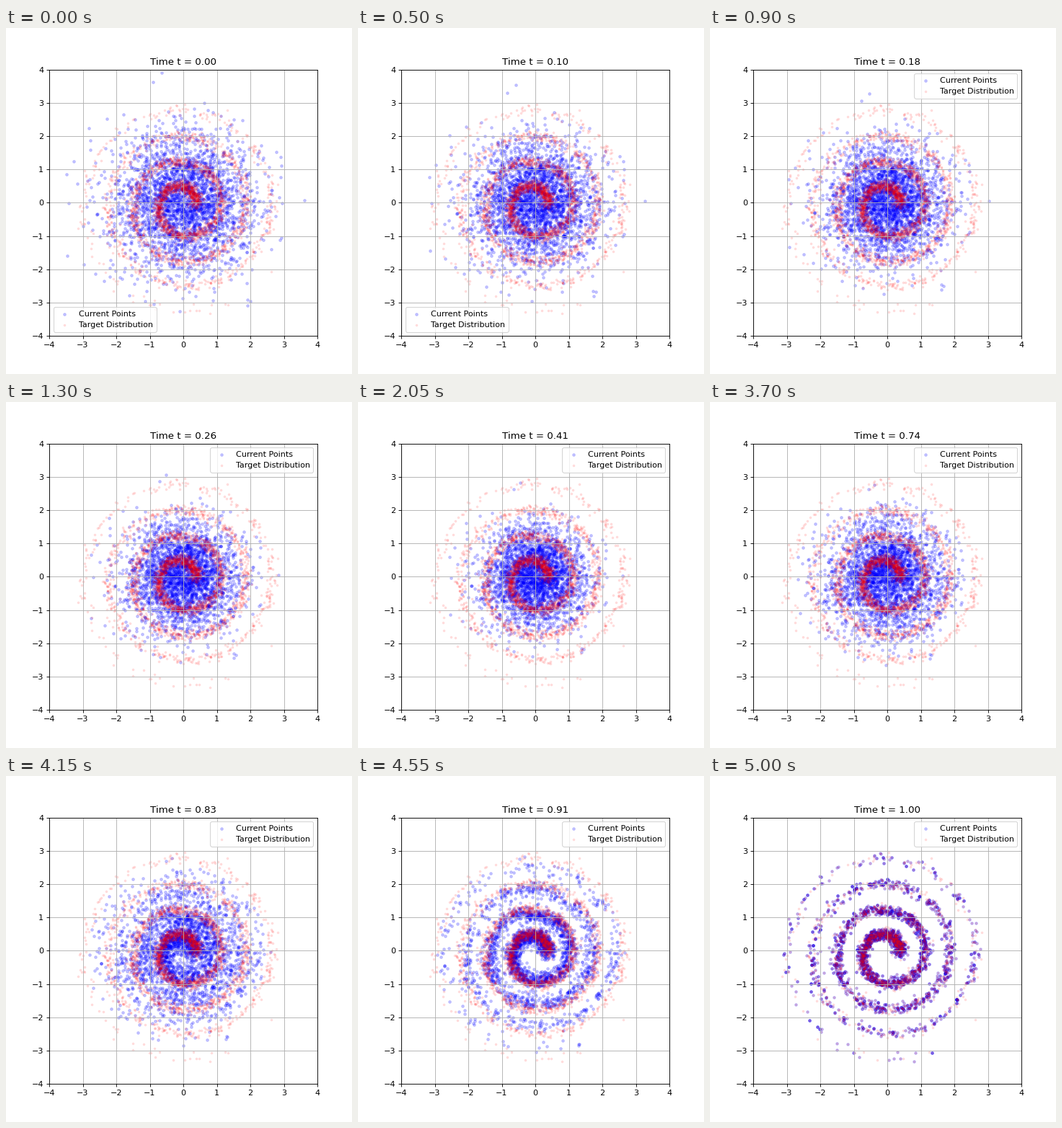
Animation of 480 by 480 pixels, one loop 5050 ms. Source, as a matplotlib script:

```python
import numpy as np
import matplotlib.pyplot as plt
from matplotlib.animation import FuncAnimation

STEPS = 100
N = 3000
TURNS = 4
LEGEND_MOVE = 0.11

rng = np.random.default_rng(7)


def make_target(n):
    """Noisy spiral whose density falls linearly towards its outer end."""
    turn = TURNS * (1 - np.sqrt(rng.random(n)))
    radius, angle = 0.36 + 0.755 * turn, 2 * np.pi * turn
    spiral = np.column_stack([radius * np.cos(angle),
                              radius * np.sin(angle) - 0.06])
    return (spiral + rng.normal(0, 0.09, (n, 2))).astype(np.float32)


def with_ones(a):
    return np.hstack([a, np.ones((len(a), 1), np.float32)])


def expected_end(x, t, ends):
    """Mean end point of the straight paths that pass through x at time t."""
    bias = -t * t * (ends ** 2).sum(1, keepdims=True) / 2
    keys = (np.hstack([t * ends, bias]) / (1 - t) ** 2).T.astype(np.float32)
    parts = []
    for block in np.array_split(x, 12):
        w = with_ones(block) @ keys
        w -= w.max(axis=1, keepdims=True)
        np.exp(w, out=w)
        total = w @ with_ones(ends)
        parts.append(total[:, :2] / total[:, 2:])
    return np.vstack(parts)


def flow(x, ends):
    """Euler steps along the flow from the cloud to the target."""
    path = [x]
    for k in range(STEPS):
        t = k / STEPS
        # the kernel is wide early on, so a subset is enough
        seen = ends[::3] if t < 0.5 else ends
        x = x + (expected_end(x, t, seen) - x) / (STEPS - k)
        path.append(x)
    return path


target = make_target(N)
path = flow(rng.normal(size=(N, 2)).astype(np.float32), target)

fig, ax = plt.subplots(figsize=(6, 6), dpi=80)
ax.set(xlim=(-4, 4), ylim=(-4, 4))
ax.grid(True)
points = ax.scatter(*path[0].T, s=10, c="blue", alpha=0.2, label="Current Points")
ax.scatter(*target.T, s=5, c="red", alpha=0.1, label="Target Distribution")
title = ax.set_title("Time t = 0.00")
legend = ax.legend(loc="lower left")


def update(k):
    t = k / STEPS
    points.set_offsets(path[k])
    title.set_text(f"Time t = {t:.2f}")
    legend.set_loc("lower left" if t < LEGEND_MOVE else "upper right")
    return points, title, legend


anim = FuncAnimation(fig, update, frames=STEPS + 1, interval=50,
                     repeat=True, repeat_delay=0)
plt.show()
```
